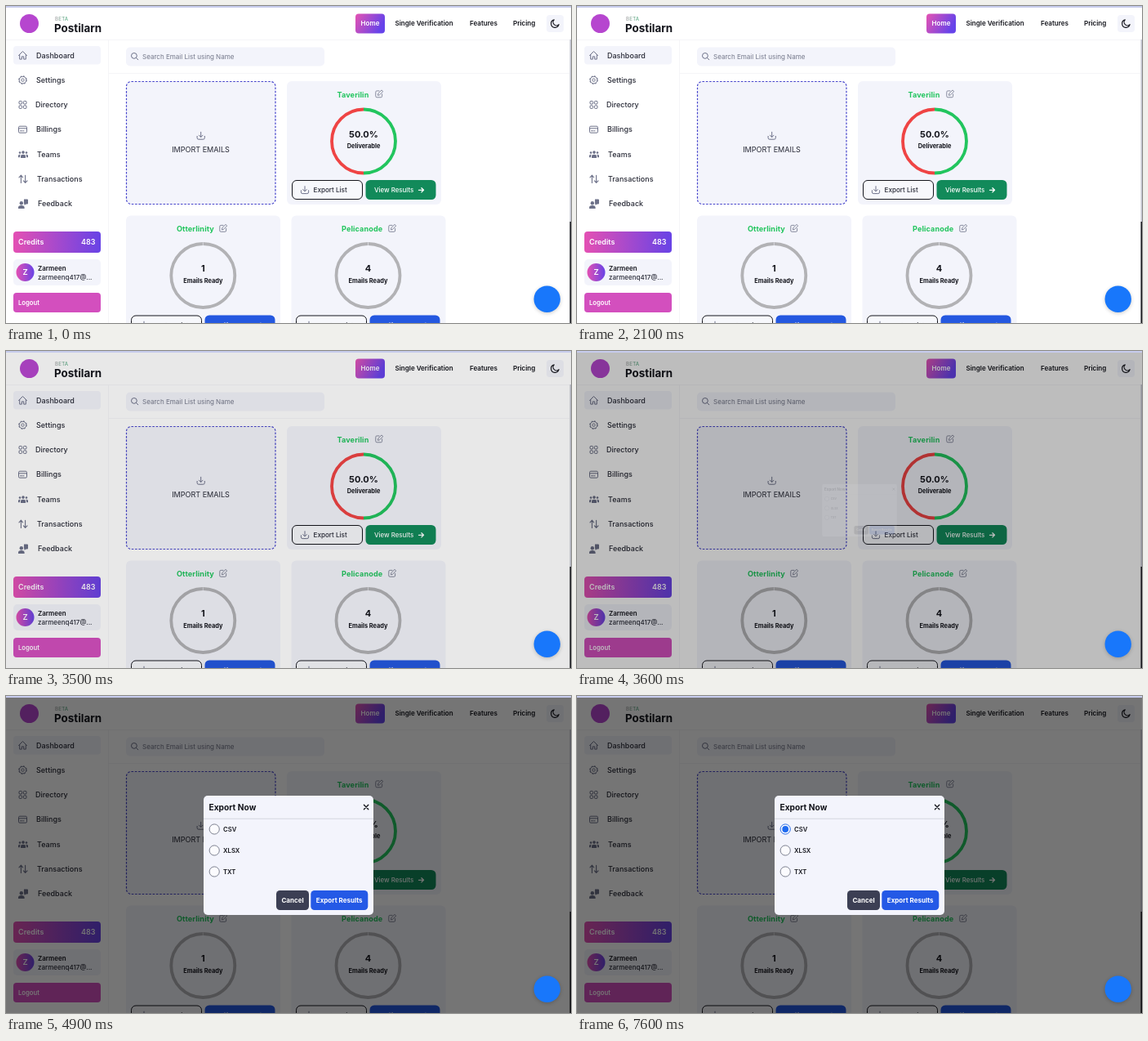
An HTML page that plays this animation: 692x388 px, repeating every 8000 ms.

```html
<!DOCTYPE html>
<html lang="en">
<head>
<meta charset="utf-8">
<title>Email list dashboard</title>
<style>
  html, body { margin: 0; width: 100%; height: 100%; overflow: hidden; background: #fff; }
  svg { display: block; width: 692px; height: 388px; font-family: Inter, "Open Sans", sans-serif; }
</style>
</head>
<body>
<svg id="stage" viewBox="0 0 692 388" xmlns="http://www.w3.org/2000/svg"></svg>
<script>
const LOOP = 8000, STEP = 100;
const INK = '#14151c', SIDE = '#2a2c38', PANEL = '#f3f4fb', ICON = '#6d7189', GREEN = '#22c55e';
const RING = '#7d8190', RULE = '#f5f5f8';

const rect = (x, y, w, h, r, fill, extra = '') =>
  `<rect x="${x}" y="${y}" width="${w}" height="${h}" rx="${r}" fill="${fill}" ${extra}/>`;
const circle = (x, y, r, fill, extra = '') =>
  `<circle cx="${x}" cy="${y}" r="${r}" fill="${fill}" ${extra}/>`;
const line = (d, color = ICON, width = 1) =>
  `<path d="${d}" fill="none" stroke="${color}" stroke-width="${width}" stroke-linecap="round" stroke-linejoin="round"/>`;
// y is the middle of the capitals
const text = (x, y, str, size, weight = 500, fill = INK, extra = '') =>
  `<text x="${x}" y="${y + size * 0.364}" font-size="${size}" font-weight="${weight}" fill="${fill}" ${extra}>${str}</text>`;
const mid = (x, y, str, size, weight, fill = INK, extra = '') =>
  text(x, y, str, size, weight, fill, `text-anchor="middle" ${extra}`);
const at = (x, y, body) => `<g transform="translate(${x} ${y})">${body}</g>`;

const download = line('M0-4.5V1.5M-2.3-.6L0 1.7L2.3-.6M-4.6.6V2.6Q-4.6 4.4-2.8 4.4H2.8Q4.6 4.4 4.6 2.6V.6');
const pencil = line('M0-3.6H-2.8Q-4.2-3.6-4.2-2.2V3Q-4.2 4.3-2.8 4.3H2.2Q3.6 4.3 3.6 3V.4M-1.5 1.5L-1.1-.6L3-4.6L4.8-2.9L.7 1.1Z', '#7a7e92', 0.9);
const arrow = line('M-3 0H3M.4-2.6L3 0L.4 2.6', '#fff', 1.3);

const icons = {
  home: line('M-5 .2L0-4.8L5 .2M-3.8-.8V4.8H-1.2V1.6H1.2V4.8H3.8V-.8'),
  gear: circle(0, 0, 1.7, 'none', `stroke="${ICON}"`) + circle(0, 0, 4.3, 'none', `stroke="${ICON}"`) +
    circle(0, 0, 4.9, 'none', `stroke="${ICON}" stroke-width=".9" stroke-dasharray="1.9 1.948"`),
  grid: [-2.7, 2.7].map(x => [-2.7, 2.7].map(y =>
    rect(x - 1.8, y - 1.8, 3.6, 3.6, 1, 'none', `stroke="${ICON}"`)).join('')).join(''),
  card: rect(-5, -4, 10, 8, 1.4, 'none', `stroke="${ICON}"`) + line('M-5-1.4H5M-3 1.6H-1M.2 1.6H1.4'),
  team: circle(0, -2.4, 1.8, ICON) + circle(-4, -2, 1.3, ICON) + circle(4, -2, 1.3, ICON) +
    `<path d="M-3 4.5V2.4Q-3 .2 0 .2T3 2.4V4.5ZM-6 3.8V1.8Q-6 0-3.4.3Q-4 1.2-4 3.8ZM6 3.8V1.8Q6 0 3.4.3Q4 1.2 4 3.8Z" fill="${ICON}"/>`,
  swap: line('M-2.6 4.6V-4.4M-5-2L-2.6-4.6L-.4-2M2.6-4.6V4.4M.4 2L2.6 4.6L5 2', ICON, 1.1),
  talk: circle(-2.2, -.8, 2.2, ICON) +
    `<path d="M-6 5.8V4.6Q-6 2-2.2 2T1.6 4.6V5.8ZM1-5.5H5Q6-5.5 6-4.5V-.6Q6 .4 5 .4H3.4L1.6 2V.4Q.9.4.9-.6Z" fill="${ICON}"/>`
};

function header() {
  const nav = [[476.5, 'Single Verification'], [568, 'Features'], [621, 'Pricing']];
  return circle(28.5, 21.5, 11.5, '#b646cf') +
    text(60, 15.5, 'BETA', 6, 500, 'url(#beta)', 'letter-spacing=".3"') +
    text(59, 27.5, 'Postilarn', 13.4, 700) +
    rect(428, 9.5, 36, 24, 4, 'url(#brandDiag)') +
    mid(446, 21.5, 'Home', 8, 600, '#fff') +
    nav.map(([x, s]) => text(x, 21.5, s, 8.05, 600)).join('') +
    rect(662, 11, 21, 21, 4, PANEL) +
    at(672.5, 21.5, line('M4.6 1.2A4.8 4.8 0 1 1-1.2-4.6A3.9 3.9 0 0 0 4.6 1.2Z', INK, 1.2)) +
    rect(0, 41, 690, 1, 0, RULE);
}

function sidebar() {
  const rows = [
    ['home', 37, 'Dashboard'], ['gear', 37, 'Settings'], ['grid', 36, 'Directory'], ['card', 37, 'Billings'],
    ['team', 38, 'Teams'], ['swap', 38, 'Transactions'], ['talk', 39, 'Feedback']
  ];
  return rect(125, 42, 1, 346, 0, RULE) + rect(9, 49, 107, 22.5, 4, PANEL) +
    rows.map(([icon, x, s], i) => {
      const y = 60.3 + i * 30.3;
      return at(i > 3 ? 21 : 20.5, y, icons[icon]) + text(x, y, s, 9, 500, SIDE);
    }).join('') +
    rect(9, 276, 107, 26, 4, 'url(#brand)') +
    text(15, 289, 'Credits', 9, 600, '#fff') +
    text(109.5, 289, '483', 9, 600, '#fff', 'text-anchor="end"') +
    rect(9, 310, 107, 32, 5, PANEL) +
    circle(23.5, 326, 11, 'url(#brand)') + mid(23.5, 326, 'Z', 9.5, 600, '#fff') +
    text(39, 320.8, 'Zarmeen', 8, 600) +
    text(39, 332.2, 'zarmeenq417@...', 8, 500, SIDE) +
    rect(9, 351, 107, 24, 4, '#d34fbe') + text(15, 363, 'Logout', 7.7, 600, '#fff');
}

function buttons(x, y, left, right, color, leftAt) {
  return rect(x, y, 86, 23, 5.5, '#f7f8fc', `stroke="${INK}"`) + at(x + 15.5, y + 11.7, download) +
    text(x + leftAt, y + 11.8, left, 8.1, 500, SIDE) +
    rect(x + 90, y - .5, 86, 24, 5.5, color) + text(x + 100.5, y + 11.8, right, 7.9, 500, '#fff') +
    at(x + 158, y + 11.8, arrow);
}

function listCard(x, y, name, cx, titleX, value, label, ring) {
  const cy = y + 73.5;
  return rect(x, y, 189, 151, 6, PANEL) +
    text(titleX, y + 16.5, name, 9.1, 700, GREEN, 'letter-spacing=".1"') +
    ring(cx, cy) + mid(cx, cy - 8.7, value, 11, 700) + mid(cx, cy + 6.3, label, 7.4, 700);
}

const half = (cx, cy, sweep, color) =>
  `<path d="M${cx} ${cy - 39}A39 39 0 0 ${sweep} ${cx} ${cy + 39}" fill="none" stroke="${color}" stroke-width="3.8"/>`;
const splitRing = (x, y) => half(x, y, 0, '#ef4444') + half(x, y, 1, GREEN);
const greyRing = (x, y) => circle(x, y, 39, 'none', 'stroke="#b2b2b5" stroke-width="3.8"') +
  line(`M${x} ${y - 40.5}V${y - 37.5}`, '#e4e4ea', 0.8);

function lists() {
  return rect(147, 50.5, 243, 23, 5, PANEL) +
    at(157.5, 61.5, circle(-.6, -.6, 3.4, 'none', `stroke="${ICON}"`) + line('M2 2L4.3 4.3')) +
    text(167, 62, 'Search Email List using Name', 8.05, 400, '#737789') +
    rect(126, 82, 564, 1, 0, RULE) +
    rect(147.5, 92.5, 182.5, 150, 6, PANEL, 'stroke="#4846cc" stroke-width="1.2" stroke-dasharray="2.6 1.7"') +
    at(238.7, 158.8, download) + mid(238.5, 176, 'IMPORT EMAILS', 9.05, 400, SIDE) +
    listCard(344, 92, 'Taverilin', 438, 405.5, '50.0%', 'Deliverable', splitRing) + at(457, 107.5, pencil) +
    buttons(350.5, 213.5, 'Export List', 'View Results', '#128a5a', 26) +
    listCard(147, 256.5, 'Otterlinity', 241.3, 209, '1', 'Emails Ready', greyRing) + at(266, 272, pencil) +
    buttons(153.5, 379, 'Updated List', 'Verify Now', '#2458e0', 21) +
    listCard(349.5, 256.5, 'Pelicanode', 443.5, 411, '4', 'Emails Ready', greyRing) + at(473, 272, pencil) +
    buttons(355.5, 379, 'Updated List', 'Verify Now', '#2458e0', 21);
}

function dialog() {
  return rect(242, 122, 208, 146, 5, '#f3f4fc') +
    text(248.5, 136, 'Export Now', 10.2, 700) +
    line('M438.4 133.2L443.8 138.8M443.8 133.2L438.4 138.8', INK, 1.3) +
    rect(242, 149.7, 208, 1, 0, '#d5d7df') +
    ['CSV', 'XLSX', 'TXT'].map((s, i) => {
      const y = 163 + i * 26;
      return circle(255.2, y, 6.1, '#fbfbfe', `id="ring${i}" stroke="${RING}" stroke-width="1"`) +
        text(266, y, s, 7.7, 600);
    }).join('') +
    circle(255.2, 163, 0, '#1f6bf0', 'id="dot"') +
    rect(331, 238, 40, 24, 4.5, '#3c3f54') + mid(351, 250, 'Cancel', 8, 700, '#fff') +
    rect(373.3, 238, 70, 24, 4.5, '#2459e6') + mid(408.2, 250, 'Export Results', 8, 700, '#fff');
}

const gradient = (id, from, to, y2 = 0) =>
  `<linearGradient id="${id}" x2="1" y2="${y2}"><stop stop-color="${from}"/><stop offset="1" stop-color="${to}"/></linearGradient>`;

document.getElementById('stage').innerHTML =
  '<defs>' + gradient('brand', '#e450b3', '#6843e6') + gradient('brandDiag', '#e553b2', '#6643ea', 0.35) +
  gradient('beta', '#a9a3a8', '#58b487') +
  '<filter id="soft" x="-50%" y="-50%" width="200%" height="200%"><feGaussianBlur stdDeviation="2.5"/></filter></defs>' +
  rect(0, 0, 692, 388, 0, '#fff') + header() + sidebar() + lists() +
  rect(690.5, 41, 1.5, 223, 0, '#c3c5d2') + rect(690.5, 264, 1.5, 124, 0, '#15161c') +
  rect(0, 0, 692, 388, 0, '#000', 'id="shade" opacity="0"') +
  rect(0, 0, 692, 2, 0, '#c6cbec') +
  `<g id="dialog">${dialog()}</g>` +
  circle(662.7, 360, 16, '#000', 'opacity=".22" filter="url(#soft)"') + circle(662.7, 358.7, 16.2, '#1877fb');

const [shade, box, ring, dot] = ['shade', 'dialog', 'ring0', 'dot'].map(id => document.getElementById(id));

// [time, value] pairs joined by straight lines
function track(t, keys) {
  if (t <= keys[0][0]) return keys[0][1];
  for (let i = 1; i < keys.length; i++) {
    const [t0, a] = keys[i - 1], [t1, b] = keys[i];
    if (t <= t1) return a + (b - a) * (t - t0) / (t1 - t0);
  }
  return keys[keys.length - 1][1];
}

const DIM = [[3300, 0], [3400, .03], [3500, .09], [3600, .26], [3700, .53], [3800, .54]];
const SCALE = [[3500, 0], [3600, .44], [3700, .865], [3800, .97], [3900, 1]];
const FADE = [[3500, 0], [3600, .1], [3700, .58], [3800, .9], [3900, 1]];
const DOT = [[4900, 0], [5000, 2.6], [5100, 3.9]];

function draw(time) {
  const t = Math.floor(time / STEP) * STEP;
  const s = track(t, SCALE), r = track(t, DOT);
  shade.setAttribute('opacity', track(t, DIM));
  box.setAttribute('opacity', track(t, FADE));
  box.setAttribute('display', s ? 'inline' : 'none');
  box.setAttribute('transform', `translate(346 195) scale(${s}) translate(-346 -195)`);
  dot.setAttribute('r', r);
  ring.setAttribute('stroke', r ? '#2c6fe8' : RING);
}

const start = performance.now();
function tick() {
  draw((performance.now() - start) % LOOP);
  requestAnimationFrame(tick);
}
tick();
</script>
</body>
</html>
```
